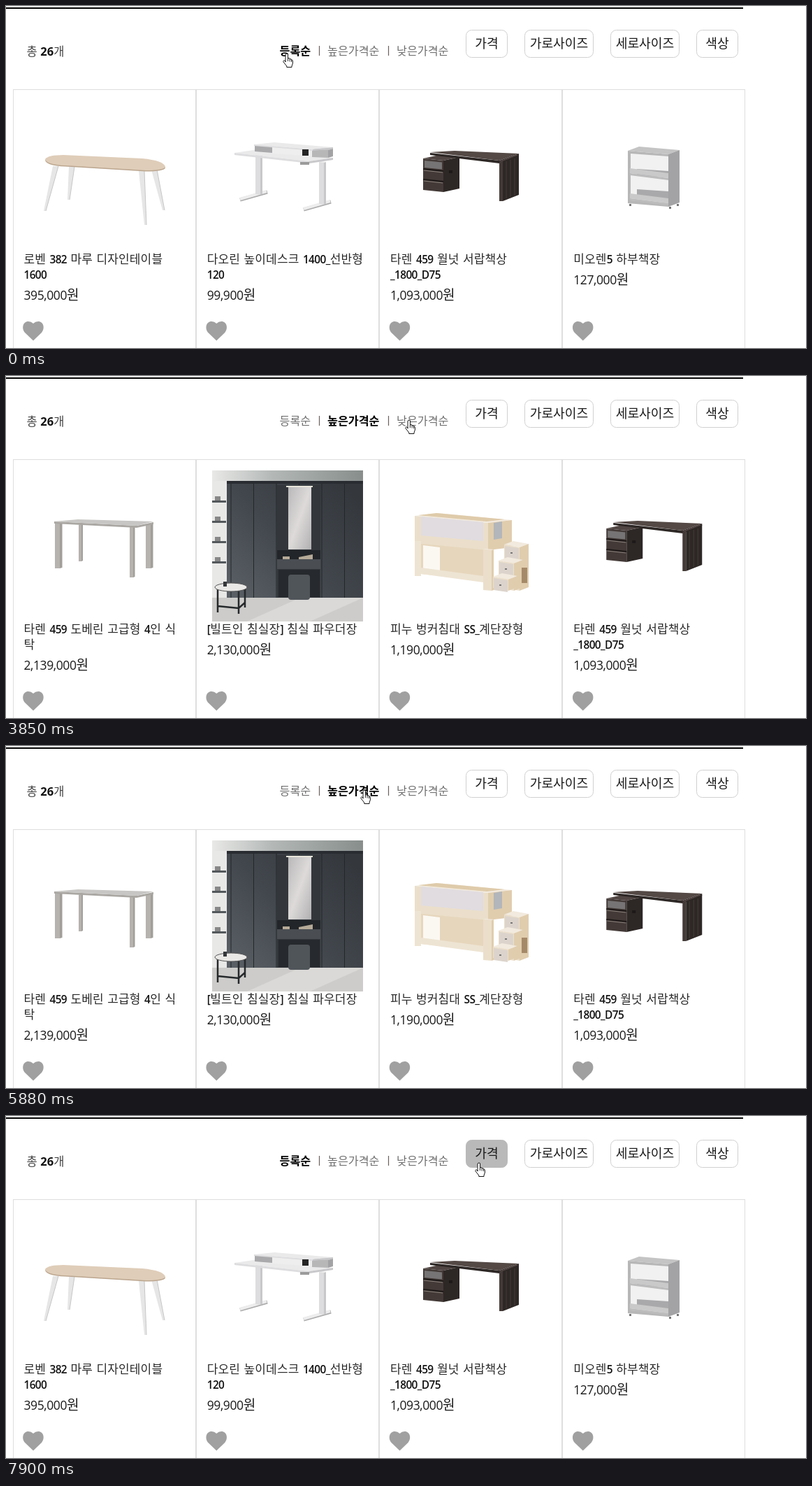
Animation of 1145x489 px, one loop 8 s. Source, as an HTML page:

```html
<!DOCTYPE html>
<html lang="ko">
<head>
<meta charset="utf-8">
<title>상품 정렬</title>
<style>
  html, body { margin: 0; width: 100%; height: 100%; overflow: hidden; background: #fff; }
  svg { display: block; width: 100vw; height: 100vh; }
  text { font-family: "Noto Sans CJK KR", "Noto Sans CJK", sans-serif; font-weight: 350; fill: #1a1a1a; }
  .n { font-family: "Open Sans", "Noto Sans", sans-serif; }
  .title { font-size: 17px; letter-spacing: .15px; word-spacing: .5px; fill: #2a2a2a; }
  .title .n { font-size: 15.4px; font-weight: 600; letter-spacing: -.6px; fill: #111; }
  .price { font-size: 19px; font-weight: 500; }
  .price .n { font-size: 17.5px; font-weight: 400; letter-spacing: -.4px; }
  .count { font-size: 16.5px; fill: #444; }
  .count .n { font-weight: 700; fill: #111; }
  .sort { font-size: 16.2px; fill: #707070; }
  .sort.on { font-weight: 700; fill: #000; }
  .button text { font-size: 18.2px; text-anchor: middle; }
  .button rect { fill: #fff; stroke: #d0d0d0; }
  .button.hover rect { fill: #b9b9b9; stroke: #b9b9b9; }
</style>
</head>
<body>
<svg id="stage" viewBox="0 0 1145 489">
  <defs>
    <linearGradient id="glass" x2="1" y2="1">
      <stop stop-color="#b9b8b9"/><stop offset=".5" stop-color="#dddad9"/><stop offset="1" stop-color="#b1b0b1"/>
    </linearGradient>
    <linearGradient id="wall" x2="1">
      <stop stop-color="#e9e9e7"/><stop offset=".4" stop-color="#b3b8b6"/><stop offset="1" stop-color="#878e8c"/>
    </linearGradient>
    <linearGradient id="doors" y1="1" x2="1" y2=".2">
      <stop stop-color="#5b6167"/><stop offset=".5" stop-color="#42474d"/><stop offset="1" stop-color="#34383d"/>
    </linearGradient>
  </defs>
</svg>
<script>
const LOOP = 8000, STEP = 78, PITCH = 262.25;
const stage = document.getElementById('stage');

const range = (n, make) => Array.from({ length: n }, (_, i) => make(i)).join('');
const path = (fill, d, extra = '') => `<path fill="${fill}" d="${d}" ${extra}/>`;
const line = (color, d, width = 1) => path('none', d, `stroke="${color}" stroke-width="${width}"`);
const rect = (fill, x, y, w, h, extra = '') =>
  `<rect fill="${fill}" x="${x}" y="${y}" width="${w}" height="${h}" ${extra}/>`;
const latin = text => text.replace(/[\w,[\]]+/g, run => `<tspan class="n">${run}</tspan>`);
const label = (kind, x, y, text) => `<text class="${kind}" x="${x}" y="${y}">${latin(text)}</text>`;

const shade = ([h, s, l], change = 0) => `hsl(${h} ${s}% ${l + change}%)`;
// parallelogram from a corner along two edges
const face = (fill, x, y, ax, ay, bx, by) => path(fill, `M${x} ${y}l${ax} ${ay}l${bx} ${by}l${-ax} ${-ay}z`);
// solid with top, front (edge a) and side (edge b) in three shades
const block = (tone, x, y, [ax, ay], [bx, by], h) =>
  face(shade(tone, 5), x, y, ax, ay, bx, by) +
  face(shade(tone), x, y, ax, ay, 0, h) +
  face(shade(tone, -8), x + ax, y + ay, bx, by, 0, h);
const taper = (x, y, dx, h) => {
  const d = `M${x - 4} ${y}l${dx + 2} ${h}h3L${x + 4} ${y}`;
  return path('#e6e6e6', d) + line('#c6c6c6', `M${x + 4} ${y}L${x + dx + 1} ${y + h}`);
};

const WHITE = [240, 2, 87], GREY = [270, 1, 72], WALNUT = [15, 10, 24], BIRCH = [37, 45, 86],
  PINK = [318, 34, 88], BLUE = [204, 9, 67], STONE = [30, 4, 70];

const ovalTable = () => {
  const top = 'M56 219Q60 213 82 213L195 218Q226 221 228 230Q226 235 200 235L85 228Q58 227 56 219Z';
  return taper(94, 230, -4, 47) + taper(212, 234, 14, 58) + taper(71, 229, -15, 64) + taper(194, 236, 6, 77) +
    path('#bba58e', top, 'transform="translate(0 1.5)"') + path('#dfcdb9', top);
};

const motionDesk = () => {
  const leg = (x, y) => line('#aaa', `M${x - 26} ${y + 58}l39 -11`, 5) + line('#ededee', `M${x - 26} ${y + 57}l38 -11`, 4) +
    block(WHITE, x - 4, y - 10, [7, 1], [3, -1], 60);
  return leg(361, 219) + leg(452, 233) + block(WHITE, 327, 210, [107, 12], [34, -5], 3) +
    face('#eee', 356, 199, 85, 6, 0, 10) + face('#aaa9ab', 356, 199, 25, 2, 0, 9) +
    block(GREY, 438, 205, [23, 1], [7, -2], 11) + block(WHITE, 355, 198, [84, 7], [29, -3], 2) +
    rect('#252526', 424, 205, 9, 9) + rect('#9b9b9b', 421, 223, 13, 4);
};

const walnutDesk = () =>
  block(WALNUT, 597, 218, [29, 3], [23, -5], 45) + face('#777475', 599, 221, 25, 2.5, 0, 10) +
  range(2, i => line('#1f1a19', `M597 ${233 + i * 15}l29 3`, 2) + line('#8a817c', `M598 ${235 + i * 15}l27 3`)) +
  path('#2d2726', 'M607 210L706 221L734 211V214L706 225L607 213Z') +
  path(shade(WALNUT, 6), 'M607 209L642 207L734 211L706 221Z') +
  block(WALNUT, 706, 222, [5, 0], [23, -9], 57) +
  range(3, i => line('#51453f', `M${716 + i * 6} ${222 - i * 2}v53`, .7)) +
  rect('#1d1918', 634, 235, 5, 4);

const lowShelf = () =>
  block(GREY, 890, 207, [58, 5], [16, -6], 75) + face('#f1f1f1', 894, 211, 54, 4, 0, 67) +
  range(2, i => {
    const y = 239 + i * 36;
    return face('#a9a8aa', 903, y - 6 - i * 7, 45, 3, 0, 9 + i * 4) + block([270, 1, 74], 893, y, [55, 7], [0, -7], 3);
  }) +
  range(2, i => rect('#777', 892 + i * 57, 283 + i * 4, 3, 3)) + rect('#777', 960, 283, 3, 3);

const slimTable = () => {
  const leg = (x, y, h, w) => block(STONE, x, y, [w, 0], [w / 2, -1], h);
  return leg(104, 213, 52, 4) + leg(70, 211, 64, 7) + leg(177, 216, 72, 5) + leg(200, 212, 63, 7) +
    path('#aaa7a3', 'M69 208L187 214L211 209V212L187 217L69 211Z') + path('#c7c6c4', 'M69 208L103 205L211 208L187 214Z');
};

const dressingRoom = () =>
  rect('url(#wall)', 295, 135, 216, 216) + rect('#e8e8e7', 295, 150, 21, 168) +
  range(4, i => rect('#53585b', 295, 178 + i * 29, 20, 3) + rect('#888', 299, 172 + i * 29, 8, 6)) +
  rect('#cdccca', 295, 317, 216, 34) + face('#dad9d7', 345, 351, 90, 0, 76, -34) +
  rect('url(#doors)', 316, 150, 195, 167) + rect('#292d32', 316, 150, 195, 4) +
  range(6, i => line('#23272b', `M${322 + i * 32.5} 154V317`)) +
  rect('#33373c', 388, 156, 62, 161) + rect('url(#glass)', 404, 158, 33, 90) + line('#e8e5da', 'M401 158H439', 2) +
  rect('#222529', 388, 249, 62, 13) + rect('#4a4e53', 388, 262, 62, 14) + rect('#26292d', 390, 277, 59, 39) +
  path('#b6aa98', 'M396 258h10v4h-10zM419 259l20 -4v7h-20z') +
  rect('#50555a', 404, 284, 31, 36, 'rx="4"') +
  line('#26292b', 'M303 304V338M333 306V340M342 302V331M303 329L333 332L342 324', 2.5) +
  '<ellipse cx="322" cy="302" rx="23" ry="6" fill="#e9e8e6" stroke="#555"/>' + rect('#33373a', 311, 294, 5, 7);

const loftBed = () => {
  const step = i => {
    const x = 713 - 8 * i, y = 241 + 23 * i;
    return block(BIRCH, x, y, [22, 4], [13, -5], 62 - 23 * i) +
      face('#dcd4cc', x + 1, y + 2, 20, 3, 0, 17) + rect('#777', x + 9, y + 11, 3, 2);
  };
  return face(shade(BIRCH, -4), 594, 239, 96, 9, 0, 44) + face('#fbf8f2', 597, 242, 24, 3, 0, 36) +
    face(shade(BIRCH, 2), 594, 274, 89, 12, 0, 9) +
    block(BIRCH, 585, 200, [105, 10], [34, -4], 39) + face(shade(BIRCH, -9), 590, 199, 98, 9, 26, -3) +
    face('#e0dce0', 594, 201, 89, 8, 0, 27) + face('#b3b6ba', 698, 210, 12, -2, 0, 24) +
    rect(shade(BIRCH, 2), 585, 236, 9, 50) + block(BIRCH, 683, 248, [12, 1], [3, -1], 58) +
    range(3, step) + rect('#a58a69', 738, 274, 8, 22);
};

const monitorShelf = () =>
  block(GREY, 83, 232, [37, 4], [10, -2], 11) + face('#3b2d2a', 84, 234, 34, 3, 0, 9) +
  block(GREY, 180, 243, [3, 0], [12, -4], 11) + block(GREY, 83, 230, [98, 11], [14, -4], 2);

const walnutPanel = () =>
  rect('#3b251e', 333, 219, 140, 50) +
  range(12, i => line(i % 3 ? '#2d1b16' : '#5a3b2c', `M333 ${221 + i * 4.2}q60 ${2 * Math.sin(i * 2.1)} 140 0`, 1.2));

const pinkPad = () =>
  block(PINK, 585, 241, [128, 21], [33, -23], 3) + line('#b7a7b3', 'M738 238h9v4', 1.5) +
  block([300, 3, 90], 624, 239, [53, 9], [7, -2], 3);

const blueShelf = () => {
  // front face narrows towards the right; u runs along it
  const point = (u, v) => `${847 + 172 * u} ${242 - 8 * u + v * (36 - 8 * u)}`;
  const panel = (fill, u0, u1, v0, v1) =>
    path(fill, `M${point(u0, v0)}L${point(u1, v0)}L${point(u1, v1)}L${point(u0, v1)}Z`);
  const bay = i => {
    const u = .02 + i * .365, end = Math.min(u + .34, .98);
    return panel('#78838a', u, end, .2, .88) + panel('#96a1a8', u, end, .68, .88);
  };
  return path(shade(BLUE, 7), 'M836 236L992 231L1019 234L847 242Z') + face(shade(BLUE, -9), 836, 236, 11, 6, 0, 36) +
    panel(shade(BLUE), 0, 1, 0, 1) + range(3, bay) + panel('#e2dede', .76, .98, .52, .88) +
    line('#555', 'M990 255l10 -1', 2);
};

const desk = ['타렌 459 월넛 서랍책상', '_1800_D75', '1,093,000원'];
const catalogs = [
  [
    ['로벤 382 마루 디자인테이블', '1600', '395,000원', ovalTable()],
    ['다오린 높이데스크 1400_선반형', '120', '99,900원', motionDesk()],
    [...desk, walnutDesk()],
    ['미오렌5 하부책장', '', '127,000원', lowShelf()],
  ], [
    ['타렌 459 도베린 고급형 4인 식', '탁', '2,139,000원', slimTable()],
    ['[빌트인 침실장] 침실 파우더장', '', '2,130,000원', dressingRoom()],
    ['피누 벙커침대 SS_계단장형', '', '1,190,000원', loftBed()],
    [...desk, `<g transform="translate(${PITCH})">${walnutDesk()}</g>`],
  ], [
    ['미오렌5 모니터선반', '', '49,000원', monitorShelf()],
    ['타렌 459 월넛 하부가림판_1800_', '책상용', '50,000원', walnutPanel()],
    ['레노K 누빔데스크 다오린 패드', '세트', '60,000원', pinkPad()],
    ['로벤 273 선반장 데코 블루 1200', '', '85,000원', blueShelf()],
  ],
];

const product = ([title, more, price, art], i) => {
  const x = 25.5 + PITCH * i;
  return art + label('title', x, 368, title) + label('title', x, 390, more) +
    label('price', x, more ? 419.5 : 398, price);
};
const card = i =>
  rect('none', Math.round(9.6 + PITCH * i) + .5, 119.5, 261, 400, 'stroke="#dedede"') +
  path('#a0a0a0', 'M15 27.5L3 16C-2 10 0 0 8 0Q12 0 15 3Q18 0 22 0C30 0 32 10 27 16Z',
    `transform="translate(${24 + PITCH * i} 451)"`);
const button = (x, w, text) =>
  `<g class="button">${rect('', x + .5, 34.5, w - 1, 39, 'rx="8"')}<text x="${x + w / 2}" y="60">${text}</text></g>`;

stage.innerHTML += rect('#000', 0, 2, 1055, 2) + label('count', 29.5, 71, '총 26개') +
  label('sort', 391.5, 69.5, '등록순') + label('sort', 460, 69.5, '높은가격순') + label('sort', 559, 69.5, '낮은가격순') +
  line('#6b6259', 'M448.5 57V71M547.5 57V71', 1.2) +
  button(658, 60, '가격') + button(742, 99, '가로사이즈') + button(865, 99, '세로사이즈') + button(988, 60, '색상') +
  range(4, card) +
  catalogs.map(items => `<g class="catalog">${items.map(product).join('')}</g>`).join('') +
  `<g id="cursor">${path('#fff', 'M-1 12V2Q-1 0 1 0T2.5 2V7Q5 5.5 5.2 8Q7.4 6.8 7.6 9Q9.4 8.6 9.4 11V14L8 18V19.5H.8V18L-4.2 11.6Q-4 8.6-1 11Z', 'stroke="#151515" stroke-linejoin="round"')}
   ${line('#151515', 'M2.4 7v4M5.1 8v3.5M7.6 9v3', .9)}
   <circle id="click" cx="-1" r="12" fill="#ff0" fill-opacity=".47"/></g>`;

const sorts = stage.querySelectorAll('.sort');
const groups = stage.querySelectorAll('.catalog');
const priceButton = stage.querySelector('.button');
const cursor = document.getElementById('cursor');
const click = document.getElementById('click');

// Each visit glides to a control, presses it, then the label and the products follow.
const visits = [
  { start: 750, end: 980, x: 471, y: 64, bow: -8, press: 1610, release: 1830, sorted: 1830, loaded: 1980, order: 1 },
  { start: 2990, end: 3470, x: 576, y: 63, bow: 4.5, press: 3700, release: 3850, sorted: 3920, loaded: 4000, order: 2 },
  { start: 5010, end: 5250, x: 512, y: 63, bow: 0, press: 5420, release: 5640, sorted: 5640, loaded: 5710, order: 1 },
  { start: 5880, end: 6470, x: 421, y: 65, bow: 0, press: 6560, release: 6710, sorted: 6790, loaded: 6790, order: 0 },
  { start: 7190, end: 7900, x: 676, y: 67, bow: 19 },
];

const orderAt = (t, moment) => visits.reduce((order, visit) => visit[moment] <= t ? visit.order : order, 0);
const ease = p => p < .5 ? 4 * p ** 3 : 1 - 4 * (1 - p) ** 3;

function cursorAt(t) {
  let x = 401, y = 68;
  for (const visit of visits.filter(({ start }) => start <= t)) {
    const steps = Math.round((visit.end - visit.start) / STEP);
    const gap = (visit.end - visit.start) / steps;
    const step = Math.floor((t - visit.start) / gap + .001) + 1;
    const p = ease(Math.min(1, step / (steps + 1)));
    x += (visit.x - x) * p;
    y += (visit.y - y) * p + visit.bow * Math.sin(Math.PI * p);
  }
  return [x, y];
}

function draw(t) {
  const [x, y] = cursorAt(t);
  const sort = orderAt(t, 'sorted'), catalog = orderAt(t, 'loaded');
  const pressed = visits.some(({ press, release }) => t >= press && t < release);
  sorts.forEach((el, i) => el.classList.toggle('on', i === sort));
  groups.forEach((el, i) => el.setAttribute('display', i === catalog ? 'inline' : 'none'));
  priceButton.classList.toggle('hover', x >= 658 && x < 718 && y >= 34 && y < 74);
  cursor.setAttribute('transform', `translate(${Math.round(x)} ${Math.round(y)})`);
  click.setAttribute('display', pressed ? 'inline' : 'none');
}

const began = performance.now();
function tick() {
  draw((performance.now() - began) % LOOP);
  requestAnimationFrame(tick);
}
tick();
</script>
</body>
</html>
```
